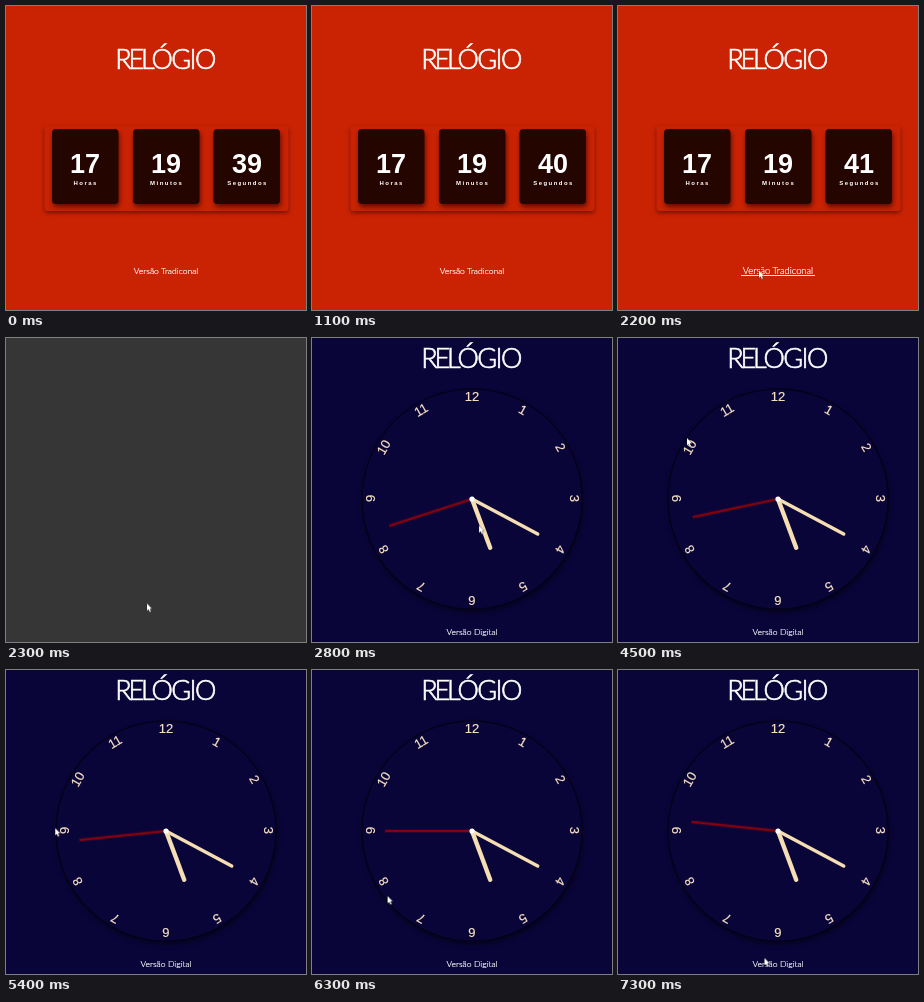
An HTML page for the animation above (7600 ms loop, 300 by 304 pixels).

```html
<!DOCTYPE html>
<html lang="pt">
<head>
<meta charset="utf-8">
<title>Relógio</title>
<style>
html, body { margin: 0; width: 100%; height: 100%; overflow: hidden; background: #363636; }
svg { display: block; width: 300px; height: 304px; }
text { text-anchor: middle; fill: #fff; }
.title { font: 300 27px Lato, sans-serif; letter-spacing: -1.6px; stroke: #fff; stroke-width: .7px; }
.tight { letter-spacing: -3.2px; }
.link { font: 300 8.6px Lato, sans-serif; stroke: #fff; stroke-width: .2px; }
.over { font-size: 9.4px; }
.num { font: bold 27px "Liberation Sans", Arial, sans-serif; }
.label { font: bold 6px "Liberation Sans", Arial, sans-serif; letter-spacing: 1.45px; }
.mark { font: 13px "Liberation Sans", Arial, sans-serif; fill: #f8e2c2; stroke: #f8e2c2; stroke-width: .2px; }
.panel { filter: drop-shadow(0 2px 2px rgba(60, 5, 0, .6)); }
.tile { fill: #240500; filter: drop-shadow(1px 3px 2.5px rgba(40, 0, 0, .65)); }
.dial { filter: drop-shadow(1px 3px 2px rgba(0, 0, 10, .5)); }
.hand { stroke-linecap: round; }

.digital, .analog, .s39, .s40, .s41, .idle, .over, .cursor, .second {
  animation: 7.6s step-end infinite;
}
.digital { animation-name: digital; }
.analog { animation-name: analog; }
.s39 { animation-name: s39; }
.s40 { animation-name: s40; }
.s41 { animation-name: s41; }
.idle { animation-name: idle; }
.over { animation-name: over; }
.second { animation-name: tick; }
.cursor { animation-name: show; }
.pointer { animation: move 7.6s linear infinite; }

@keyframes digital { 0% { opacity: 1 } 30.263%, 100% { opacity: 0 } }
@keyframes analog { 0% { opacity: 0 } 32.895%, 100% { opacity: 1 } }
@keyframes s39 { 0% { opacity: 1 } 10.526%, 100% { opacity: 0 } }
@keyframes s40 { 0% { opacity: 0 } 10.526% { opacity: 1 } 23.684%, 100% { opacity: 0 } }
@keyframes s41 { 0% { opacity: 0 } 23.684%, 100% { opacity: 1 } }
@keyframes idle { 0% { opacity: 1 } 26.315%, 100% { opacity: 0 } }
@keyframes over { 0% { opacity: 0 } 26.315%, 100% { opacity: 1 } }
@keyframes show { 0% { opacity: 0 } 19.736%, 100% { opacity: 1 } }
@keyframes tick {
  0% { transform: rotate(246deg) }
  36.842% { transform: rotate(252deg) }
  50% { transform: rotate(258deg) }
  63.157% { transform: rotate(264deg) }
  76.315% { transform: rotate(270deg) }
  89.473%, 100% { transform: rotate(276deg) }
}
@keyframes move {
  0%, 19.737% { transform: translate(17px, 240px) }
  22.368% { transform: translate(68px, 268px) }
  23.684% { transform: translate(118px, 268px) }
  26.316%, 28.947% { transform: translate(141px, 264.5px) }
  30.263%, 32.895% { transform: translate(141px, 265.5px) }
  36.842% { transform: translate(167px, 187.5px) }
  39.474%, 50% { transform: translate(170px, 178px) }
  59.211% { transform: translate(69px, 100px) }
  68.421% { transform: translate(50px, 140px) }
  75% { transform: translate(48px, 185px) }
  82.895% { transform: translate(75.5px, 226px) }
  92.105%, 100% { transform: translate(146.5px, 288px) }
}
</style>
</head>
<body>
<svg viewBox="0 0 300 304">
  <rect width="300" height="304" fill="#363636"/>

  <g class="digital">
    <rect width="300" height="304" fill="#ca2304"/>
    <text class="title" x="159" y="63"><tspan class="tight">REL</tspan>ÓGIO</text>
    <rect class="panel" x="38.5" y="120" width="244" height="85" rx="3" fill="#ca2304"/>
    <rect class="tile" x="46" y="123" width="66.5" height="75" rx="4"/>
    <rect class="tile" x="127" y="123" width="66.5" height="75" rx="4"/>
    <rect class="tile" x="207.5" y="123" width="66.5" height="75" rx="4"/>
    <g class="num">
      <text x="79" y="167">17</text>
      <text x="160" y="167">19</text>
      <text class="s39" x="241" y="167">39</text>
      <text class="s40" x="241" y="167">40</text>
      <text class="s41" x="241" y="167">41</text>
    </g>
    <g class="label">
      <text x="79.7" y="179">Horas</text>
      <text x="160.7" y="179">Minutos</text>
      <text x="241.5" y="179">Segundos</text>
    </g>
    <text class="link idle" x="160" y="268">Versão Tradiconal</text>
    <g class="over">
      <text class="link over" x="160" y="268">Versão Tradiconal</text>
      <path d="M123 269.5H197" stroke="#fff" stroke-width=".9"/>
    </g>
  </g>

  <g class="analog">
    <rect width="300" height="304" fill="#0a0538"/>
    <text class="title" x="159" y="30"><tspan class="tight">REL</tspan>ÓGIO</text>
    <circle class="dial" cx="160" cy="161" r="110" fill="#0a0538" stroke="#04021a" stroke-width="1.3"/>
    <g id="marks" transform="translate(160 160.3)"></g>
    <g transform="translate(160 161)">
      <path class="hand" d="M0 0V-52" stroke="#f5deb3" stroke-width="4.4" transform="rotate(159.5)"/>
      <path class="hand" d="M0 0V-74.5" stroke="#f5deb3" stroke-width="3.4" transform="rotate(118.1)"/>
      <path class="second" d="M0 0V-87" stroke="#84000f" stroke-width="2.5"/>
      <circle r="2.6" fill="#fff"/>
    </g>
    <text class="link" x="160" y="297">Versão Digital</text>
  </g>

  <g class="cursor">
    <path class="pointer" d="M0 0V7.2L1.6 5.7 2.8 8.4 4 7.9 2.8 5.3H5Z"
      fill="#fff" stroke="#111" stroke-width=".5" paint-order="stroke"/>
  </g>
</svg>
<script>
const marks = document.getElementById('marks');
for (let hour = 1; hour <= 12; hour++) {
  const mark = document.createElementNS('http://www.w3.org/2000/svg', 'text');
  mark.setAttribute('class', 'mark');
  mark.setAttribute('y', -97.5);
  mark.setAttribute('transform', `rotate(${hour * 30})`);
  mark.textContent = hour;
  marks.append(mark);
}
</script>
</body>
</html>
```
